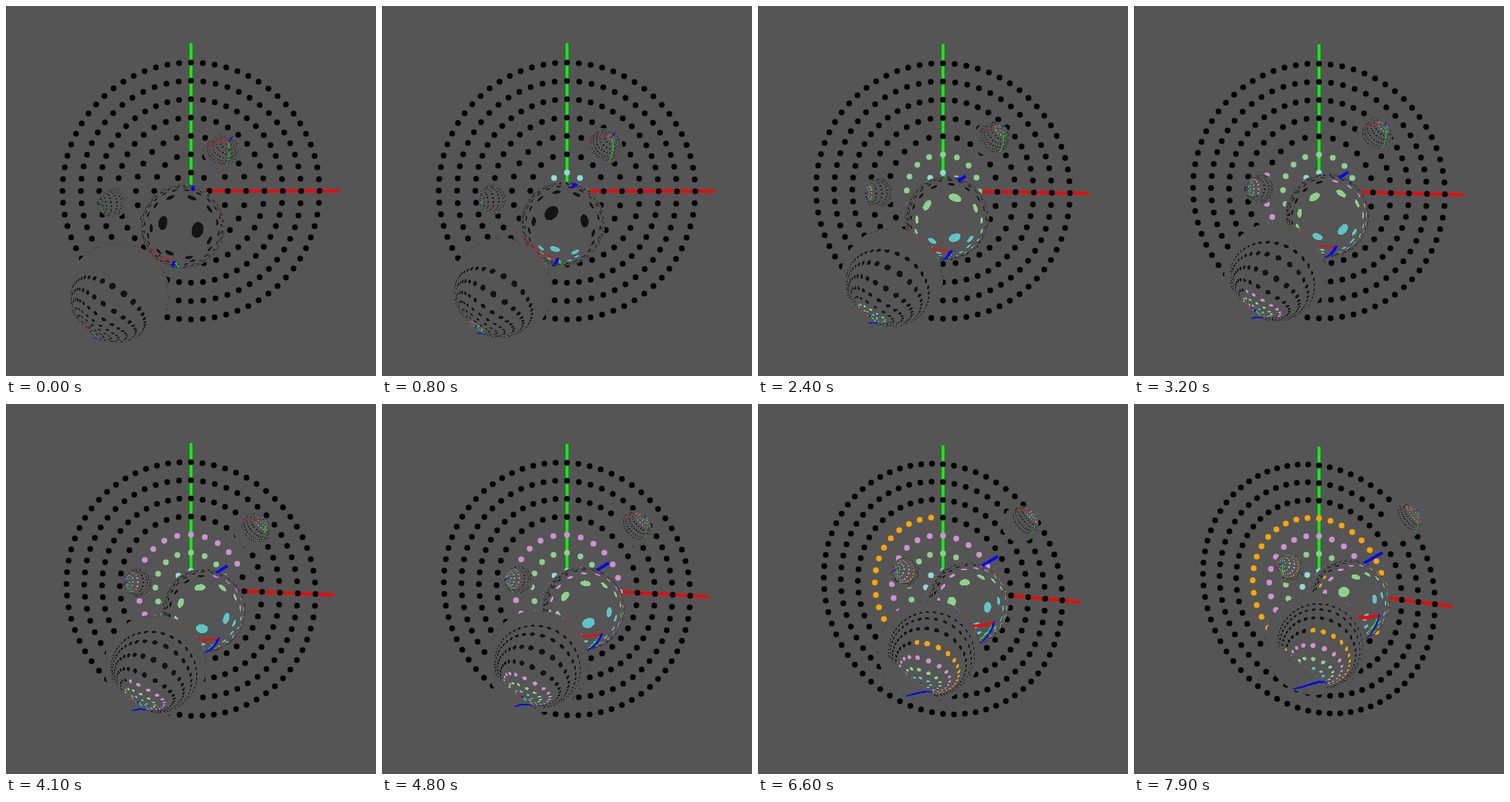
Recreate the animation shown at these times as an HTML page with a canvas. Size 512 by 512 pixels, loop 8000 ms.

```html
<!DOCTYPE html>
<html lang="en">
<head>
<meta charset="utf-8">
<title>Glass spheres over dotted rings</title>
<style>
html, body { margin: 0; width: 100%; height: 100%; overflow: hidden; background: #555; }
canvas { display: block; width: 512px; height: 512px; }
</style>
</head>
<body>
<canvas id="stage" width="512" height="512"></canvas>
<script>
const SIZE = 512, MID = 256, STEP = 100, STEPS = 80;
const GAP = 25.4, DOT = 4, AXIS_LEN = 204.5, AXIS_R = 2;
const INDEX = 1.457, F0 = 0.035, MAX_DEPTH = 5;
const BG = [85, 85, 85];
const AXES = [[255, 0, 0], [0, 255, 0], [0, 0, 255]];
const COUNTS = [8, 16, 24, 36, 48, 56, 68];
// Dot colours by ring; the glass greys the unlit ones and deepens the cyan
const GREEN = [143, 208, 143], PLUM = [208, 145, 208], ORANGE = [255, 165, 0];
const OPEN = { unlit: [0, 0, 0], lit: [[150, 216, 216], GREEN, PLUM, ORANGE] };
const GLASS = { unlit: [20, 20, 20], lit: [[95, 196, 196], GREEN, PLUM, ORANGE] };
// Centre x, y, z and radius, in stage pixels
const BALLS = [
  [-13.4, -50.4, 120, 58.6],
  [-103.7, -144.7, 207, 70.7],
  [39.7, 53.4, 188.5, 25.4],
  [-110.2, -17.7, 134.3, 21.1]
];

let total = 1;
const STARTS = COUNTS.map(n => { const s = total; total += n; return s; });

const ctx = document.getElementById('stage').getContext('2d', { willReadFrequently: true });
let step = 0;

const dot = (a, b) => a[0] * b[0] + a[1] * b[1] + a[2] * b[2];
const add = (a, b, k) => [a[0] + b[0] * k, a[1] + b[1] * k, a[2] + b[2] * k];
const unit = a => add([0, 0, 0], a, 1 / Math.sqrt(dot(a, a)));
const css = c => `rgb(${c})`;

// Dots run clockwise from the bottom of each ring
function dotAt(ring, i) {
  const a = 2 * Math.PI * i / COUNTS[ring], r = (ring + 1) * GAP;
  return [-Math.sin(a) * r, -Math.cos(a) * r, 0];
}

const tint = (look, ring, i) => STARTS[ring] + i <= step ? look.lit[ring] : look.unlit;

function camera(n) {
  const out = unit([-(0.0148 + 0.00585 * n), -(0.0128 + 0.00382 * n), 1]);
  const right = unit([out[2], 0, -out[0]]);
  const up = [
    out[1] * right[2] - out[2] * right[1],
    out[2] * right[0] - out[0] * right[2],
    out[0] * right[1] - out[1] * right[0]
  ];
  return { out, right, up };
}

function hitBall(o, d, ball) {
  const oc = [o[0] - ball[0], o[1] - ball[1], o[2] - ball[2]];
  const b = dot(oc, d), q = b * b - dot(oc, oc) + ball[3] * ball[3];
  if (q <= 0) return Infinity;
  const h = Math.sqrt(q);
  if (-b - h > 0.01) return -b - h;
  return -b + h > 0.01 ? -b + h : Infinity;
}

// Capped cylinder along coordinate k
function hitAxis(o, d, k) {
  const i = (k + 1) % 3, j = (k + 2) % 3;
  const a = d[i] * d[i] + d[j] * d[j], b = o[i] * d[i] + o[j] * d[j];
  const q = b * b - a * (o[i] * o[i] + o[j] * o[j] - AXIS_R * AXIS_R);
  if (q <= 0 || a < 1e-9) return Infinity;
  const h = Math.sqrt(q), e = -o[k] / d[k], f = (AXIS_LEN - o[k]) / d[k];
  const near = Math.max((-b - h) / a, Math.min(e, f));
  const far = Math.min((-b + h) / a, Math.max(e, f));
  return near < far && near > 0.01 ? near : Infinity;
}

function hitDot(o, d) {
  const t = -o[2] / d[2];
  if (!(t > 0)) return null;
  const x = o[0] + d[0] * t, y = o[1] + d[1] * t, r = Math.hypot(x, y);
  if (r > 9 * GAP) return null;
  const turn = Math.atan2(-x, -y) / (2 * Math.PI) + 1, mid = Math.round(r / GAP) - 1;
  for (const ring of [mid, mid - 1, mid + 1]) {
    if (ring < 0 || ring > 6) continue;
    const n = COUNTS[ring], i = Math.round(turn * n) % n;
    const v = add(dotAt(ring, i), o, -1), along = dot(v, d);
    if (along > 0 && dot(v, v) - along * along < DOT * DOT) {
      return { t: along, color: tint(GLASS, ring, i) };
    }
  }
  return null;
}

function trace(o, d, depth) {
  let best = Infinity, color = BG, ball = null;
  for (const s of BALLS) {
    const t = hitBall(o, d, s);
    if (t < best) { best = t; ball = s; }
  }
  for (let k = 0; k < 3; k++) {
    const t = hitAxis(o, d, k);
    if (t < best) { best = t; ball = null; color = AXES[k]; }
  }
  const spot = hitDot(o, d);
  if (spot && spot.t < best) return spot.color;
  if (!ball) return color;
  if (depth >= MAX_DEPTH) return BG;

  const p = add(o, d, best);
  let n = unit([p[0] - ball[0], p[1] - ball[1], p[2] - ball[2]]);
  let c = -dot(n, d);
  const inside = c < 0;
  if (inside) { n = add([0, 0, 0], n, -1); c = -c; }
  const eta = inside ? INDEX : 1 / INDEX;
  const k = Math.max(0, 1 - eta * eta * (1 - c * c));
  const bent = add(add([0, 0, 0], d, eta), n, eta * c - Math.sqrt(k));
  const through = trace(p, unit(bent), depth + 1);
  const fresnel = F0 + (1 - F0) * Math.pow(1 - c, 5);
  if (inside || fresnel < 0.06) return through;
  const mirror = trace(p, add(d, n, 2 * c), depth + 1);
  return through.map((v, i) => v + (mirror[i] - v) * fresnel);
}

function drawFlat(toStage) {
  ctx.fillStyle = css(BG);
  ctx.fillRect(0, 0, SIZE, SIZE);
  ctx.lineWidth = 2 * AXIS_R;
  const drawAxis = k => {
    const tip = [0, 0, 0];
    tip[k] = AXIS_LEN;
    ctx.strokeStyle = css(AXES[k]);
    ctx.beginPath();
    ctx.moveTo(MID, MID);
    ctx.lineTo(...toStage(tip));
    ctx.stroke();
  };
  drawAxis(0);
  drawAxis(1);
  COUNTS.forEach((n, ring) => {
    for (let i = 0; i < n; i++) {
      ctx.fillStyle = css(tint(OPEN, ring, i));
      ctx.beginPath();
      ctx.arc(...toStage(dotAt(ring, i)), DOT, 0, 2 * Math.PI);
      ctx.fill();
    }
  });
  drawAxis(2);
}

function drawBalls(view, toStage) {
  const image = ctx.getImageData(0, 0, SIZE, SIZE);
  const ray = add([0, 0, 0], view.out, -1);
  for (const ball of BALLS) {
    const [cx, cy] = toStage(ball), r = ball[3];
    for (let y = Math.floor(cy - r); y <= cy + r; y++) {
      for (let x = Math.floor(cx - r); x <= cx + r; x++) {
        if (Math.hypot(x + 0.5 - cx, y + 0.5 - cy) >= r) continue;
        let o = add([0, 0, 0], view.out, 600);
        o = add(o, view.right, x + 0.5 - MID);
        o = add(o, view.up, MID - y - 0.5);
        const c = trace(o, ray, 0), at = (y * SIZE + x) * 4;
        for (let i = 0; i < 3; i++) image.data[at + i] = c[i];
      }
    }
  }
  ctx.putImageData(image, 0, 0);
}

function draw() {
  const view = camera(step);
  const toStage = p => [MID + dot(p, view.right), MID - dot(p, view.up)];
  drawFlat(toStage);
  drawBalls(view, toStage);
}

const begin = performance.now();
let shown = -1;
function tick() {
  step = Math.floor((performance.now() - begin) / STEP) % STEPS;
  if (step !== shown) {
    draw();
    shown = step;
  }
  requestAnimationFrame(tick);
}
tick();
</script>
</body>
</html>
```
